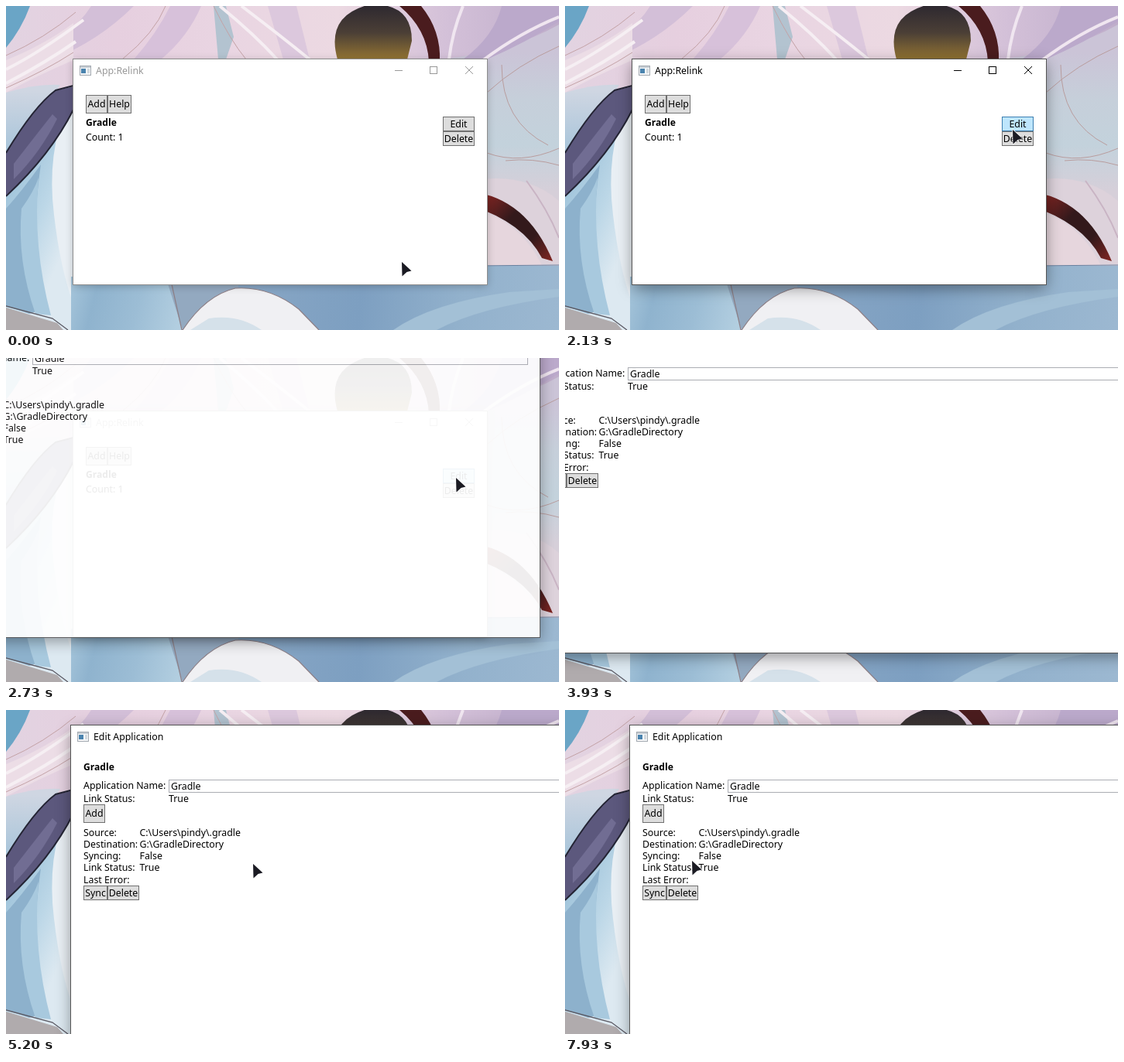
Animation of 714x419 px, one loop 8000 ms. Source, as an HTML page with a canvas:

```html
<!DOCTYPE html>
<html lang="en">
<head>
<meta charset="utf-8">
<title>Edit Application</title>
<style>
html, body { margin: 0; width: 100%; height: 100%; overflow: hidden; background: #9db9d2; }
canvas { display: block; width: 714px; height: 419px; }
</style>
</head>
<body>
<canvas id="stage" width="714" height="419"></canvas>
<script>
const W = 714, H = 419, LOOP = 8000, STEP = 1000 / 15;
const FONT = '"Noto Sans", "Open Sans", sans-serif';
let ctx = document.getElementById('stage').getContext('2d');
const layer = newLayer();
const wallpaper = paintWallpaper();

function newLayer() {
  const c = document.createElement('canvas');
  c.width = W;
  c.height = H;
  return c.getContext('2d');
}

function paintWallpaper() {
  const g = newLayer();
  const area = (color, d) => { g.fillStyle = color; g.fill(new Path2D(d)); };
  const line = (color, width, d) => {
    g.strokeStyle = color;
    g.lineWidth = width;
    g.stroke(new Path2D(d));
  };
  const fade = (x0, y0, x1, y1, ...colors) => {
    const f = g.createLinearGradient(x0, y0, x1, y1);
    colors.forEach((col, i) => f.addColorStop(i / (colors.length - 1), col));
    return f;
  };

  // Upper tones
  area(fade(0, 0, 714, 0, '#e2d3e1', '#e6cfdf', '#e9d5e2', '#ecd9e2', '#d3c0d8', '#bfadca'), 'M0 0H714V419H0Z');
  area('#6aa5c6', 'M0 0H31Q20 30 0 54Z');
  area('#d3bfd8', 'M110 0H165Q120 45 60 69H20Q85 40 110 0Z');
  area('#d7c1da', 'M212 0H252Q235 40 200 69H165Q195 35 212 0Z');
  area('#dcc8dd', 'M338 0H375L392 69H358Z');
  area('#b3c3d0', 'M268 0H284L294 40L284 69H274Z');
  area('#ecdde6', 'M0 70Q50 50 87 22V70Q40 90 0 112Z');
  line('#f6eef3', 4, 'M276 0Q320 36 350 69M304 0Q350 35 392 69');
  line('#f6eff3', 4, 'M0 100Q50 74 90 46M0 82Q44 60 100 18');
  line('#c3a2a6', 1, 'M0 64Q50 42 90 8M0 106Q50 84 87 60M150 69Q192 35 206 0M268 0Q290 45 310 69');

  // Left drapery
  area(fade(0, 110, 0, 195, '#cfd6e2', '#a4c3d9'), 'M0 112Q40 100 70 102L40 150L0 195Z');
  area(fade(0, 250, 87, 290, '#a3c6dc', '#bcd7e7', '#dde9f1'), 'M0 230L87 110V419H0Z');
  area('#e9eff4', 'M80 125Q52 190 62 270Q70 340 87 385V112Z');
  area('#8db1cc', 'M0 262Q20 240 45 205Q30 300 50 392L30 398L0 388Z');
  area('#a8c9de', 'M20 262Q36 240 42 222Q34 310 58 400L38 398Q14 330 20 262Z');
  area('#5c587d', 'M0 190Q36 130 62 110L87 104V134Q58 190 0 246Z');
  area('#716d93', 'M10 204Q44 160 60 140L66 146Q44 190 10 224Z');
  line('#242434', 2, 'M0 246Q58 192 87 134M0 190Q36 130 64 109L87 103');

  // Lower tones
  area(fade(60, 360, 225, 400, '#b3d0e2', '#8fb3ce', '#9cbdd5', '#b2cee0'), 'M84 350H216L228 419H84Z');
  area('#93a9c0', 'M206 350H330L228 419Z');
  area(fade(330, 360, 714, 400, '#86a5c4', '#7d9fc1', '#92b1cc', '#9cb8d1'), 'M300 336H714V419H300Z');
  area('#a3c0d6', 'M500 419Q550 384 650 370L714 366V376Q610 390 556 419Z');
  area('#f0f0f3', 'M228 419Q258 374 296 365Q340 362 378 392L404 419Z');
  area('#d5e1ea', 'M330 419Q300 398 262 404L238 419H330Z');
  line('#8d7f86', 1.2, 'M214 360L227 419M228 419Q258 374 296 365Q340 362 378 392L404 419');
  area('#b0abad', 'M0 390L66 410L74 419H0Z');
  line('#5b5a64', 1.3, 'M0 388L60 404L80 419');

  // Upper right tones
  area(fade(0, 0, 0, 69, '#2e2930', '#4b3f36', '#937432'), 'M428 69Q412 12 470 -2Q524 -4 524 45L518 69Z');
  area('#4a1c1e', 'M508 0H536Q562 32 560 72H546Q544 30 508 0Z');
  area(fade(0, 60, 0, 240, '#cbc4d7', '#c6cfda', '#c3d2dc', '#d6cfd9'), 'M560 69Q650 60 714 24V262L600 250Z');
  area('#bba9cb', 'M640 0H714V20Q670 48 621 69H590Q630 40 640 0Z');
  line('#f0e6f0', 4, 'M714 14Q664 34 616 70M590 0Q576 34 572 69');
  line('#b99d9e', 1, 'M714 52Q660 76 621 112M640 76Q640 150 700 180M621 190Q664 206 714 184M645 200Q680 196 714 206');

  // Right lower tones
  area('#ddd2db', 'M600 226Q670 214 714 252V336H600Z');
  area('#e6d6dd', 'M600 262Q664 276 692 336H600Z');
  area(fade(621, 250, 704, 330, '#7a2422', '#33191b', '#33191b', '#7f2522'), 'M600 240Q672 248 706 330L692 326Q668 280 600 258Z');
  line('#c9b4c4', 2, 'M672 226Q700 264 714 300');
  line('#6b82a0', 1.2, 'M600 336L714 335');
  return g.canvas;
}

function text(s, x, y, color = '#000', bold = false) {
  ctx.font = bold ? `bold 12.1px ${FONT}` : `12.35px ${FONT}`;
  ctx.fillStyle = color;
  ctx.fillText(s, x, y);
}

function box(x, y, w, h, fill, edge) {
  ctx.fillStyle = fill;
  ctx.fillRect(x, y, w, h);
  ctx.strokeStyle = edge;
  ctx.lineWidth = 1;
  ctx.strokeRect(x + 0.5, y + 0.5, w - 1, h - 1);
}

function button(label, x, y, w, h, fill = '#ddd', edge = '#707070') {
  box(x, y, w, h, fill, edge);
  ctx.textAlign = 'center';
  text(label, x + w / 2, Math.floor(y + h / 2 + 4.5));
  ctx.textAlign = 'left';
}

// Window chrome; leaves the context translated to the window corner.
function openFrame(title, x, y, w, h, active) {
  const ink = active ? '#000' : '#999';
  ctx.translate(x, y);
  ctx.save();
  ctx.shadowColor = active ? 'rgba(0,0,0,.4)' : 'rgba(0,0,0,.25)';
  ctx.shadowBlur = active ? 18 : 10;
  ctx.shadowOffsetY = active ? 5 : 2;
  ctx.fillStyle = '#fff';
  ctx.fillRect(0, 0, w, h);
  ctx.restore();
  ctx.strokeStyle = active ? '#555' : '#8d8d8d';
  ctx.lineWidth = 1;
  ctx.strokeRect(-0.5, -0.5, w + 1, h + 1);

  box(8, 8, 15, 13, '#f4f6f8', '#a3a9b0');
  ctx.fillStyle = '#c5ccd3';
  ctx.fillRect(9, 9, 13, 2);
  ctx.fillStyle = '#4a83ae';
  ctx.fillRect(10, 12, 6, 6);
  ctx.fillStyle = '#d3d9de';
  ctx.fillRect(18, 12, 3, 6);
  text(title, 29, 19, ink);

  ctx.strokeStyle = ink;
  ctx.strokeRect(w - 73.5, 9.5, 9, 9);
  ctx.beginPath();
  ctx.moveTo(w - 119, 14.5);
  ctx.lineTo(w - 109, 14.5);
  ctx.moveTo(w - 28, 9);
  ctx.lineTo(w - 18, 19);
  ctx.moveTo(w - 18, 9);
  ctx.lineTo(w - 28, 19);
  ctx.stroke();
}

function drawMain(active, editFill, editEdge) {
  ctx.save();
  openFrame('App:Relink', 87, 69, 534, 291, active);
  button('Add', 16, 46, 28, 24);
  button('Help', 44, 46, 31, 24);
  text('Gradle', 16, 86, '#000', true);
  text('Count: 1', 16, 105);
  button('Edit', 477, 74, 41, 19, editFill, editEdge);
  button('Delete', 477, 93, 41, 19);
  ctx.restore();
}

function drawDialog(x, y, hover) {
  ctx.save();
  openFrame('Edit Application', x, y, 781, 439, true);
  text('Gradle', 16, 58, '#000', true);
  text('Application Name:', 16, 82);
  box(126, 70, 640, 17, '#fff', hover ? '#7eb4ea' : '#abadb3');
  text('Gradle', 129, 83);
  text('Link Status:', 16, 99);
  text('True', 126, 99);
  button('Add', 16, 102, 28, 24);
  const rows = [['Source:', 'C:\\Users\\pindy\\.gradle'], ['Destination:', 'G:\\GradleDirectory'],
    ['Syncing:', 'False'], ['Link Status:', 'True']];
  rows.forEach(([name, value], i) => {
    text(name, 16, 143 + 15 * i);
    text(value, 88.5, 143 + 15 * i);
  });
  text('Last Error:', 16, 204);
  button('Sync', 16, 207, 31, 19);
  button('Delete', 47, 207, 41, 19);
  ctx.restore();
}

// Paints a group on its own layer, then blends it as one.
function blend(alpha, paint) {
  const stage = ctx;
  layer.clearRect(0, 0, W, H);
  ctx = layer;
  paint();
  ctx = stage;
  ctx.globalAlpha = alpha;
  ctx.drawImage(layer.canvas, 0, 0);
  ctx.globalAlpha = 1;
}

const pointer = new Path2D('M0 0L12.5 11.5L6.5 13L0.5 18.5Z');
function drawCursor(x, y) {
  ctx.save();
  ctx.translate(x, y);
  ctx.lineJoin = 'round';
  ctx.strokeStyle = 'rgba(255,255,255,.7)';
  ctx.lineWidth = 2;
  ctx.stroke(pointer);
  ctx.fillStyle = '#1b1b23';
  ctx.fill(pointer);
  ctx.restore();
}

// Pointer stops: time, x, y
const approach = [
  [0, 511, 331], [67, 506, 327], [133, 503, 324], [533, 503, 324], [1000, 509, 262],
  [1400, 517, 198], [1670, 540, 184], [2133, 578, 160], [2333, 581, 155], [2800, 581, 155],
  [3133, 400, 54], [3200, 330, 4], [3267, 250, -34], [3400, 192, -63]
];
const wander = [
  [4800, 368, 35], [4867, 364, 48], [5000, 350, 98], [5200, 319, 199], [5400, 262, 222],
  [5667, 197, 181], [5870, 184, 172], [6130, 172, 156], [6400, 170, 165], [6533, 171, 167],
  [6867, 189, 156], [7100, 178, 149], [7400, 165, 160], [7530, 180, 146], [7730, 159, 168],
  [7933, 164, 195]
];

function along(stops, t) {
  let i = 0;
  while (i < stops.length - 2 && t > stops[i + 1][0]) i++;
  const [t0, x0, y0] = stops[i], [t1, x1, y1] = stops[i + 1];
  const p = Math.min(1, Math.max(0, (t - t0) / (t1 - t0)));
  return [Math.round(x0 + (x1 - x0) * p), Math.round(y0 + (y1 - y0) * p)];
}

function draw(time) {
  const t = Math.floor((time + 4) / STEP) * STEP;
  const alpha = Math.min(1, Math.max(0, (t - 2530) / 220));
  const drag = Math.min(1, Math.max(0, (t - 3866) / 600));
  const dx = Math.round(84 - 176 * (1 - drag) ** 2.6);
  const dy = Math.round(20 - 98 * (1 - drag) ** 1.92);
  const [cx, cy] = drag === 0 ? along(approach, t) : drag < 1 ? [dx + 284, dy + 15] : along(wander, t);

  ctx.drawImage(wallpaper, 0, 0);
  if (alpha < 1) {
    const over = cx >= 564 && cx < 605 && cy >= 143 && cy < 162;
    const pressed = t > 2390 && t < 2500;
    const fill = pressed ? '#c4e5f6' : over ? '#bee6fd' : '#ddd';
    const edge = pressed ? '#2c628b' : over ? '#3c7fb1' : '#707070';
    drawMain(t > 330 && alpha === 0, fill, edge);
  }
  if (alpha > 0) {
    const over = cx >= dx + 126 && cy >= dy + 70 && cy < dy + 87;
    blend(alpha, () => drawDialog(dx, dy, over));
  }
  drawCursor(cx, cy);
}

const start = performance.now();
function tick() {
  draw((performance.now() - start) % LOOP);
  requestAnimationFrame(tick);
}
tick();
</script>
</body>
</html>
```
